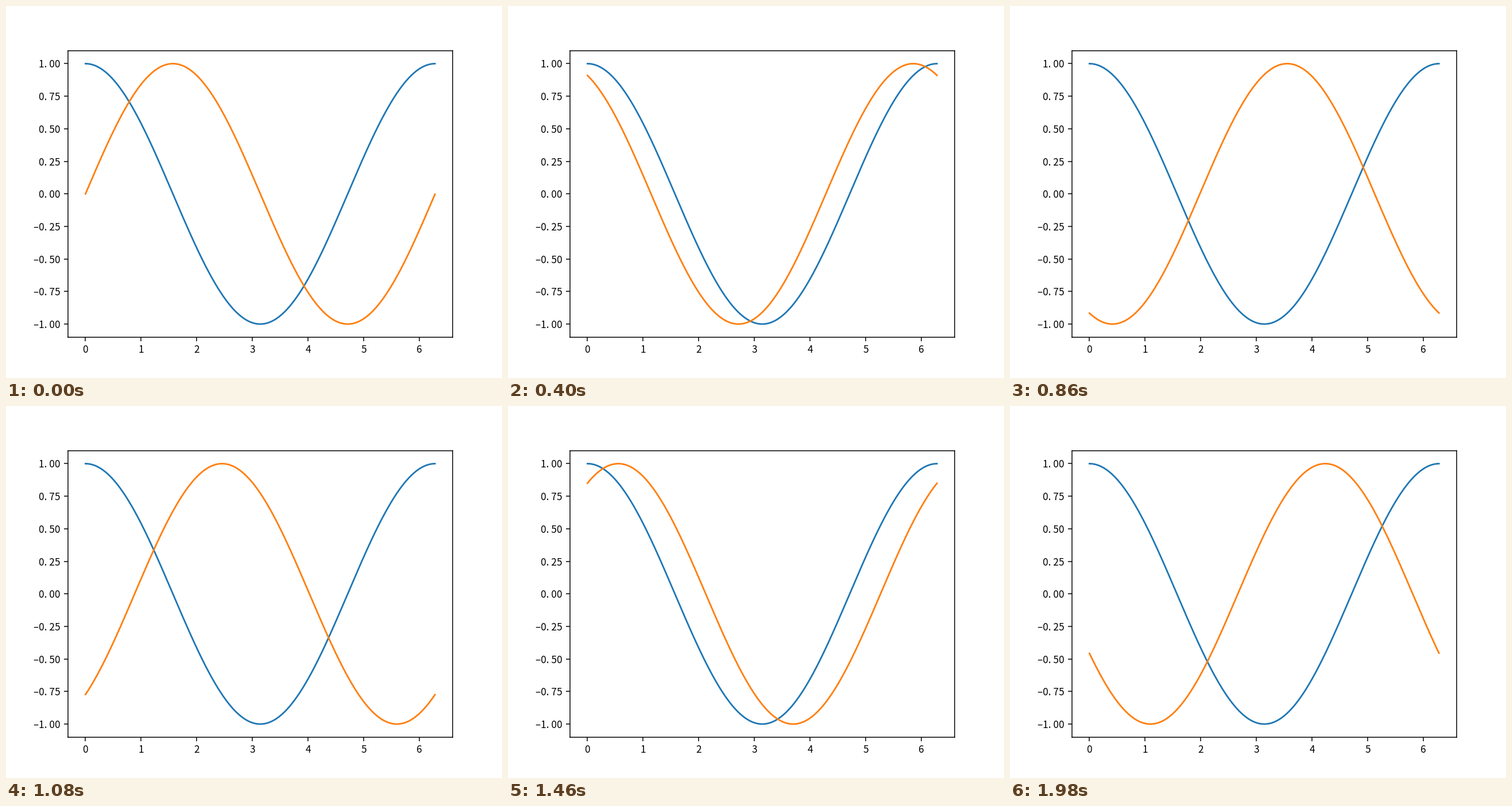
Animation of 864x648 px, one loop 2000 ms. Source, as a matplotlib script:

```python
import numpy as np
import matplotlib.pyplot as plt
from matplotlib.animation import FuncAnimation

FRAMES = 100
INTERVAL = 20  # ms
PHASE_STEP = 0.1

plt.rcParams["font.family"] = "Noto Sans CJK JP"
plt.rcParams["font.size"] = 9.23


def spaced(value, pos=None):
    """Two decimals with a wide decimal point and a long minus."""
    return f"{value:.2f}".replace(".", ". ").replace("-", "\u2013")


fig, ax = plt.subplots(figsize=(6.4, 4.8), dpi=135)
x = np.arange(0, 2 * np.pi, 0.01)
ax.plot(x, np.cos(x), color="#1f77b4", lw=1.5)
wave, = ax.plot(x, np.sin(x), color="#ff7f0e", lw=1.5)

ax.set_xticks(range(7))
ax.set_yticks(np.arange(-4, 5) / 4)
ax.yaxis.set_major_formatter(spaced)


def update(i):
    wave.set_ydata(np.sin(x + i * PHASE_STEP))
    return wave,


anim = FuncAnimation(fig, update, frames=FRAMES, interval=INTERVAL,
                     init_func=lambda: update(0), repeat=True,
                     repeat_delay=0, blit=False)
plt.show()
```
